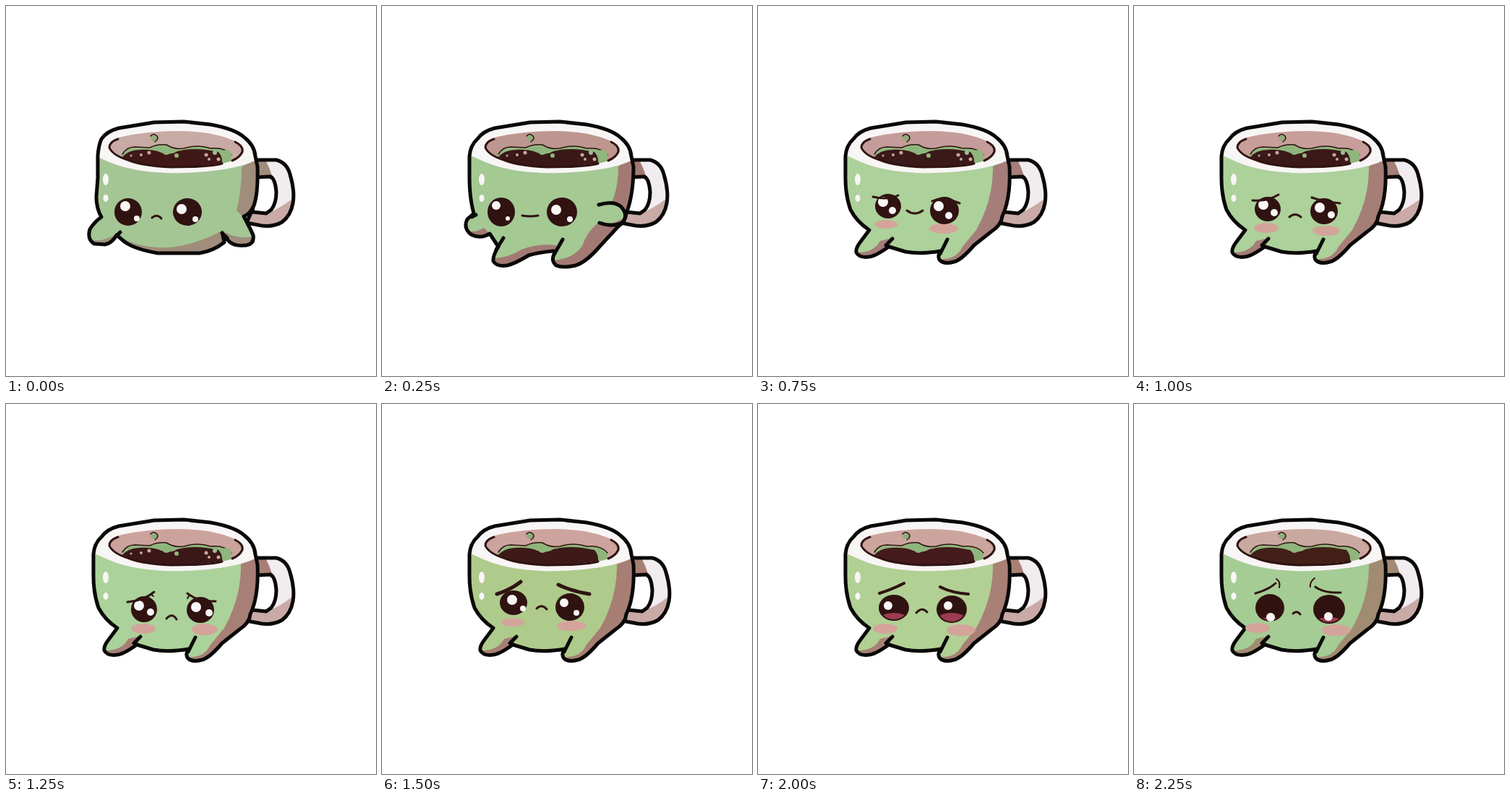
An HTML page that plays this animation: 512 px wide and 512 px high, repeating every 2.5 s.

```html
<!DOCTYPE html>
<html lang="en">
<head>
<meta charset="utf-8">
<title>Sad little cup</title>
<style>
html, body { margin: 0; width: 100%; height: 100%; overflow: hidden; background: #fff; }
svg { display: block; width: 100%; height: 100%; }
.ink { fill: none; stroke: #0a0908; stroke-width: 5; stroke-linecap: round; stroke-linejoin: round; }
.thin { fill: none; stroke: #301311; stroke-width: 3; stroke-linecap: round; stroke-linejoin: round; }
</style>
</head>
<body>
<svg id="stage" viewBox="0 0 512 512"></svg>
<script>
const stage = document.getElementById('stage');
const STEP = 250;
const DARK = '#301211', WHITE = '#f8f5f5';

const path = (d, fill) => `<path d="${d}" fill="${fill}"/>`;
const line = (d, cls = 'thin', w) => `<path d="${d}" class="${cls}"${w ? ` style="stroke-width:${w}"` : ''}/>`;
const oval = (x, y, rx, ry, fill) => `<ellipse cx="${x}" cy="${y}" rx="${rx}" ry="${ry}" fill="${fill}"/>`;
const dot = (x, y, r, fill) => oval(x, y, r, r, fill);

// Upper outline of the cup, from the left wall over the rim to the right wall
const top_ = x => `M${x} 238 L${x} 208 Q${x + 1} 193 132 184 Q140 173 156 169 L205 161 L246 160 L283 164
  Q317 170 330 182 Q344 193 345 208 L348 222`;

// Each stance: body outline, shaded area, extra limb lines
const stances = {
  lying: {
    body: top_(127) + ` Q349 260 343 276 Q338 288 329 291 Q338 308 342 317 Q344 329 333 331
      Q316 333 309 326 L300 317 L302 327 Q287 339 268 342 L210 342 Q180 337 165 327 L153 317
      Q147 328 137 330 L122 329 Q112 323 116 309 Q122 299 132 292 Q125 280 125 264 Z`,
    shade: `M326 223 L350 208 L350 265 L329 293 L319 283 Q326 255 326 223 Z
      M115 323 Q134 328 153 315 Q171 331 208 334 Q250 337 301 310 L306 328 L270 346 L208 346
      L153 320 L138 334 L115 332 Z M303 313 Q320 323 343 319 L345 335 L312 334 Z`,
    lines: 'M306 321 L299 314 M153 318 L158 313'
  },
  walking: {
    body: top_(121) + ` Q348 262 338 287 Q337 298 326 306 L301 333 Q283 354 268 359 Q250 363 241 359
      Q233 352 239 342 L237 339 Q216 341 203 345 Q183 357 173 359 Q158 361 154 353 Q153 346 161 333
      L149 315 Q136 323 123 316 Q112 307 118 295 L127 287 Q121 265 121 238 Z`,
    shade: `M327 222 L350 207 L348 275 L337 282 L317 274 Q327 253 327 222 Z
      M153 349 Q174 349 193 337 Q216 328 241 331 L240 344 L204 349 L174 364 L151 358 Z
      M236 352 Q265 350 277 332 Q284 312 299 300 Q320 304 336 292 L331 309 L303 337 L267 364 L236 364 Z
      M114 309 Q126 316 141 307 L149 315 L140 324 L114 318 Z`,
    lines: 'M300 275 Q320 269 330 277 Q341 288 334 299 Q319 307 301 300 M168 321 L158 337 M250 323 L238 344 M130 289 L124 292'
  },
  standing: {
    body: top_(121) + ` Q350 266 338 291 Q337 303 323 312 L299 331 Q281 352 271 354 Q257 358 251 351
      Q248 345 253 339 Q224 344 204 340 L181 333 Q163 346 154 347 Q140 349 136 341 Q135 335 142 326
      L154 310 Q137 299 128 282 Q121 262 121 238 Z`,
    shade: `M325 222 L350 207 L350 268 L338 301 L299 336 L270 359 L250 356 L256 350
      Q275 350 283 333 L302 310 Q326 267 325 222 Z
      M136 341 Q160 342 169 325 L186 321 L181 337 L153 350 L136 348 Z`,
    lines: 'M186 322 L177 331 M262 323 L252 343'
  }
};

// eyes: x, y, rx, ry, then glints x, y, r
const faces = {
  frown: {
    eyes: [[169, 285, 19, 19, 165, 277, 7, 181, 294, 4], [251, 285, 20, 19, 243, 281, 7, 262, 295, 4]],
    mouth: 'M202 293 Q209 287 215 294'
  },
  blank: {
    eyes: [[165, 285, 19, 20, 158, 276, 6, 174, 294, 3], [249, 285, 21, 20, 241, 282, 7, 260, 295, 4]],
    mouth: 'M194 290 Q205 292 216 290'
  },
  calm: {
    eyes: [[174, 280, 18, 18, 168, 274, 7, 182, 287, 4], [254, 283, 20, 19, 246, 277, 7, 261, 292, 4]],
    mouth: 'M202 285 Q213 290 224 285'
  },
  smile: {
    eyes: [[180, 277, 18, 17, 173, 271, 7, 186, 283, 5], [258, 283, 20, 19, 250, 277, 7, 264, 290, 5]],
    brows: ['M159 264 Q179 269 194 262', 'M241 270 Q256 263 279 273'],
    blush: [[177, 302, 16, 6], [257, 308, 20, 7]],
    mouth: 'M206 283 Q217 291 228 283'
  },
  worried: {
    eyes: [[185, 281, 18, 17, 179, 275, 7, 194, 286, 5], [263, 284, 19, 18, 257, 279, 7, 273, 289, 5]],
    brows: ['M164 269 Q184 271 200 261', 'M246 265 Q260 270 285 273'],
    blush: [[183, 307, 17, 7], [266, 311, 19, 7]],
    mouth: 'M215 292 Q223 285 231 292'
  },
  sad: {
    eyes: [[191, 284, 18, 18, 184, 279, 7, 200, 288, 5], [269, 285, 19, 18, 263, 281, 7, 281, 289, 5]],
    brows: ['M168 274 Q191 272 205 260', 'M251 262 Q266 274 290 273'],
    folds: 'M200 263 L204 266 M254 264 L251 269',
    blush: [[190, 311, 17, 7], [275, 312, 18, 8]],
    mouth: 'M222 297 Q230 288 236 298'
  },
  upset: {
    eyes: [[182, 275, 19, 17, 180, 271, 7, 195, 283, 4], [260, 281, 20, 19, 252, 275, 6, 269, 289, 4]],
    brows: ['M159 263 Q178 257 192 246', 'M244 250 Q262 259 287 263'], weight: 5,
    blush: [[181, 302, 16, 6], [262, 307, 20, 7]],
    mouth: 'M214 283 Q221 276 228 284'
  },
  teary: {
    eyes: [[188, 282, 21, 18, 180, 279, 6], [268, 284, 21, 19, 263, 279, 6]], tears: 290,
    brows: ['M168 262 Q187 256 202 248', 'M252 253 Q266 261 291 263'], weight: 4,
    blush: [[176, 311, 17, 7], [281, 313, 20, 8]],
    mouth: 'M219 289 Q227 280 234 288'
  },
  down: {
    eyes: [[188, 282, 20, 19, 189, 295, 6], [270, 284, 22, 20, 269, 294, 6]], tears: 296,
    brows: ['M168 262 Q186 257 196 248', 'M251 253 Q262 262 286 261'],
    folds: 'M197 242 Q203 246 201 254 M250 241 Q243 246 244 253', weight: 3,
    blush: [[171, 310, 17, 7], [280, 313, 20, 8]],
    mouth: 'M220 290 Q225 285 230 291'
  }
};

// stance, face, body green, shade, inner wall, liquid, bubbles
const poses = [
  ['lying', 'frown', '#a4c695', '#a08d7b', '#c8aaa4', '#401817', true],
  ['walking', 'blank', '#a4c993', '#a37a73', '#bd978f', '#391817', true],
  ['standing', 'calm', '#abcf98', '#a47d76', '#c29b97', '#3b1819', true],
  ['standing', 'smile', '#add19a', '#a57e79', '#c49c99', '#3b181a', true],
  ['standing', 'worried', '#add19a', '#a57e76', '#c79e9a', '#3b1819', true],
  ['standing', 'sad', '#abd29a', '#a77f76', '#cca29c', '#3b1718', true],
  ['standing', 'upset', '#aecb8b', '#a77e74', '#cda39d', '#3d1a18', false],
  ['standing', 'upset', '#b0ce91', '#a77e74', '#cca49d', '#401a1a', false],
  ['standing', 'teary', '#b1d094', '#a88076', '#cba59d', '#441a1c', false],
  ['standing', 'down', '#a5cc94', '#a18b72', '#c9a8a0', '#422018', false]
];

function handle(shade, dx) {
  const outer = 'M346 213 L374 213 Q389 217 393 233 Q400 256 397 273 Q394 290 382 299 Q370 306 354 304 L333 300 L340 284 Z';
  const hole = 'M347 237 L366 236 Q373 240 374 258 Q374 273 367 282 L360 287 L341 285 Z';
  return `<g transform="translate(${dx})">` +
    path(outer, '#f0ecef') +
    path('M346 213 L359 213 Q365 224 368 235 L347 238 Z', shade) +
    path('M340 285 L360 287 Q376 282 396 267 Q397 289 382 299 Q370 306 333 300 Z', '#c9aaa6') +
    path(hole, '#fff') + line(hole, 'ink') + line(outer, 'ink') + '</g>';
}

function opening(wall, liquid, bubbles) {
  const foam = 'M160 207 Q166 196 177 196 L199 197 Q209 191 222 192 Q233 199 246 197 Q266 191 283 197 Q303 195 312 205 L311 215 L299 218 L160 210 Z';
  let s = path('M142 196 Q143 186 160 181 Q196 173 238 173 Q287 173 317 187 Q329 194 328 203 Q318 216 285 220 Q235 225 190 221 Q151 213 142 196 Z', wall);
  s += path(foam, '#8fb67d');
  s += line('M161 205 Q167 195 178 195 L199 196 Q209 191 222 192 Q233 199 246 197 Q266 191 283 197 Q303 195 312 206', 'thin', 1.5);
  s += path('M161 209 Q168 200 184 199 Q204 198 215 203 Q228 207 237 201 Q259 196 277 199 L294 202 Q300 209 299 217 Q270 222 233 223 Q190 222 161 209 Z', liquid);
  s += dot(222, 200, 6, '#8fb67d') + dot(205, 182, 5, '#91ac7c') +
    line('M200 180 Q204 175 209 180 Q212 184 206 188', 'thin', 1.5);
  if (bubbles) {
    s += dot(305, 206, 7, '#8fb67d') + dot(236, 207, 3, '#8fb67d') + dot(289, 203, 3, '#9fbc8e');
    for (const [x, y, r] of [[187, 206, 2], [198, 203, 2.5], [173, 207, 1.5], [277, 206, 2.5], [281, 212, 2], [294, 212, 2.5]])
      s += dot(x, y, r, '#c6aa9c');
  }
  return s + line('M155 184 Q143 188 143 196 Q148 207 169 213 Q188 221 228 223 Q280 223 299 218') +
    line('M317 188 Q329 194 327 202 Q323 210 313 214');
}

function face({ eyes, mouth, brows = [], blush = [], folds, weight = 3, tears }, id) {
  let s = blush.map(b => oval(...b, '#d4a49b')).join('');
  eyes.forEach(([x, y, rx, ry, ...glints], i) => {
    s += oval(x, y, rx, ry, DARK);
    if (tears) {
      s += `<clipPath id="${id}${i}"><ellipse cx="${x}" cy="${y}" rx="${rx - 2}" ry="${ry - 2}"/></clipPath>` +
        `<g clip-path="url(#${id}${i})">${oval(x, tears + 8, rx - 1, 9, '#9b3c50')}</g>`;
    }
    for (let k = 0; k < glints.length; k += 3) s += dot(glints[k], glints[k + 1], glints[k + 2], WHITE);
  });
  s += brows.map(d => line(d, 'thin', weight)).join('');
  if (folds) s += line(folds, 'thin', 2);
  return s + line(mouth);
}

function cup([stance, mood, green, shade, wall, liquid, bubbles], i) {
  const { body, shade: dark, lines } = stances[stance];
  const rim = `M115 150 H355 V207 Q343 219 302 226 Q263 232 222 231 Q173 229 143 216 Q131 211 115 203 Z`;
  return `<g visibility="hidden">` + handle(shade, stance === 'walking' ? -3 : 0) +
    `<clipPath id="cup${i}"><path d="${body}"/></clipPath><g clip-path="url(#cup${i})">` +
    path(body, green) + path(dark, shade) + path(rim, WHITE) + '</g>' +
    opening(wall, liquid, bubbles) +
    oval(138, 240, 4, 8, WHITE) + oval(138, 266, 3.5, 5, WHITE) +
    line(body, 'ink') + line(lines, 'ink') +
    face(faces[mood], 'eye' + i) + '</g>';
}

stage.innerHTML = poses.map(cup).join('');
const cups = [...stage.children];

function draw(now) {
  const current = Math.floor(now / STEP) % cups.length;
  cups.forEach((g, i) => g.setAttribute('visibility', i === current ? 'visible' : 'hidden'));
}

const start = performance.now();
function tick() {
  draw(performance.now() - start);
  requestAnimationFrame(tick);
}
tick();
</script>
</body>
</html>
```
